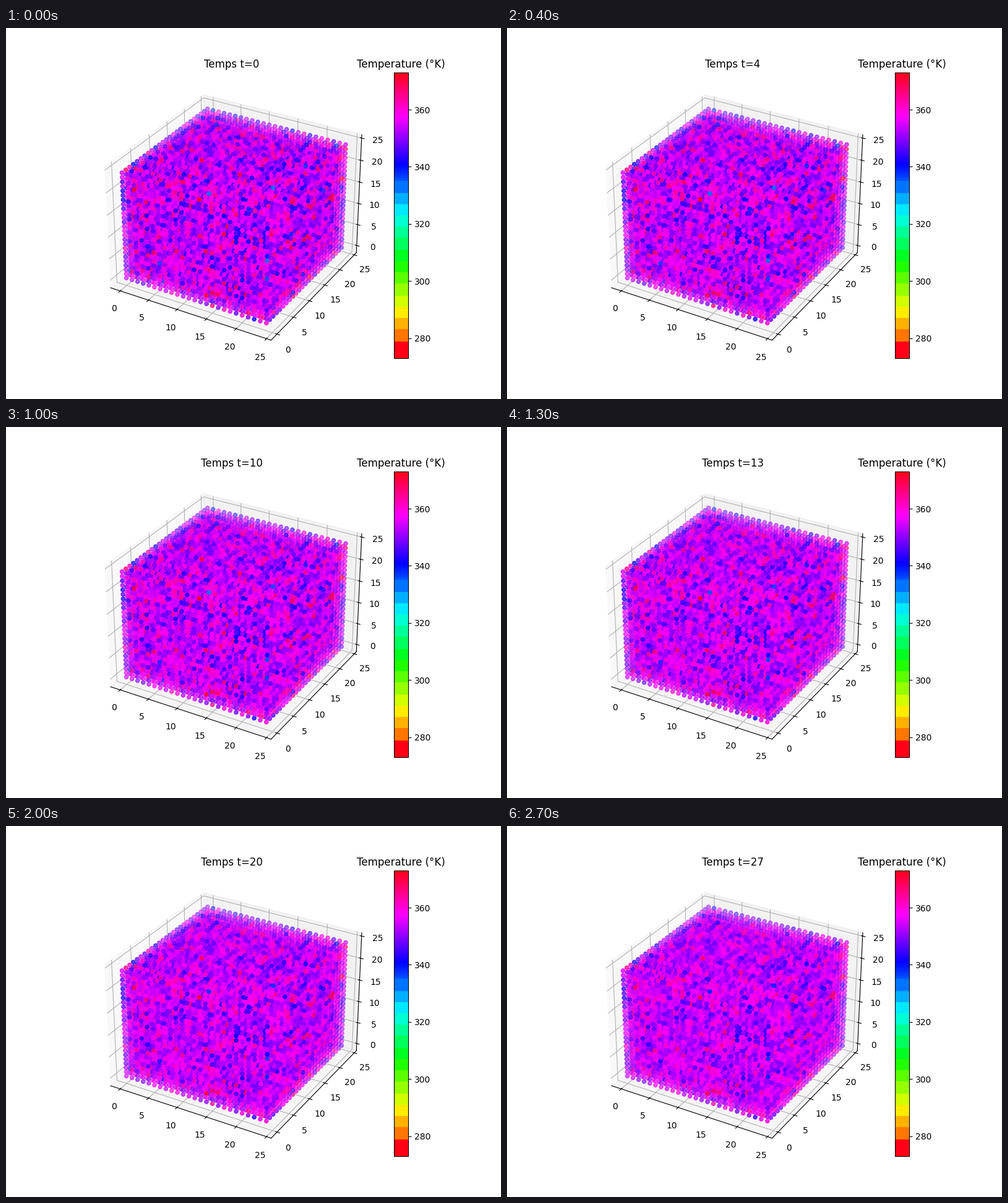
These frames come from a looping animation (800 by 600 pixels, 2800 ms). A matplotlib script:

```python
import numpy as np
import matplotlib.pyplot as plt
from matplotlib.animation import FuncAnimation
from matplotlib.colors import ListedColormap

SIZE = 25
FRAMES = 28
T_MIN, T_MAX = 273, 373
T_MEAN, T_SPREAD = 354, 6.5
STEP, STEP_START, STEP_END = 4, 279, 335
DIFFUSION = 0.002
SHELL = 6


def stepped_hsv(n=256):
    """Hue scale: red at the cold end, then flat steps, then smooth."""
    temp = T_MIN + (np.arange(n) + 0.5) / n * (T_MAX - T_MIN)
    level = (temp - STEP_START) // STEP
    flat = STEP_START + STEP * (level + 0.5)
    shown = np.where(temp < STEP_END, flat, temp)
    shown[temp < STEP_START] = T_MAX
    return ListedColormap(plt.get_cmap("hsv")((shown - T_MIN) / (T_MAX - T_MIN)))


def diffuse(temp):
    """One explicit heat step with insulated faces."""
    padded = np.pad(temp, 1, mode="edge")
    neighbours = sum(np.roll(padded, shift, axis)
                     for axis in range(3) for shift in (-1, 1))
    return temp + DIFFUSION * (neighbours[1:-1, 1:-1, 1:-1] - 6 * temp)


def simulate():
    rng = np.random.default_rng(7)
    history = [rng.normal(T_MEAN, T_SPREAD, (SIZE,) * 3)]
    while len(history) < FRAMES:
        history.append(diffuse(history[-1]))
    return history


x, y, z = np.indices((SIZE,) * 3)
last = SIZE - 1
# Only cells near the three faces turned to the viewer can be seen;
# the farthest corner stays to fix the depth shading range.
visible = np.minimum(np.minimum(last - x, y), last - z) < SHELL
visible[0, last, 0] = True
history = [temp[visible] for temp in simulate()]

fig = plt.figure(figsize=(8, 6), dpi=100)
ax = fig.add_subplot(projection="3d")
cells = ax.scatter(x[visible], y[visible], z[visible], c=history[0],
                   cmap=stepped_hsv(), vmin=T_MIN, vmax=T_MAX)
bar = fig.colorbar(cells)
bar.ax.set_title("Temperature (°K)")
title = ax.set_title("Temps t=0")


def update(step):
    cells.set_array(history[step])
    title.set_text(f"Temps t={step}")
    return cells, title


anim = FuncAnimation(fig, update, frames=FRAMES, interval=100, repeat=True)
plt.show()
```
